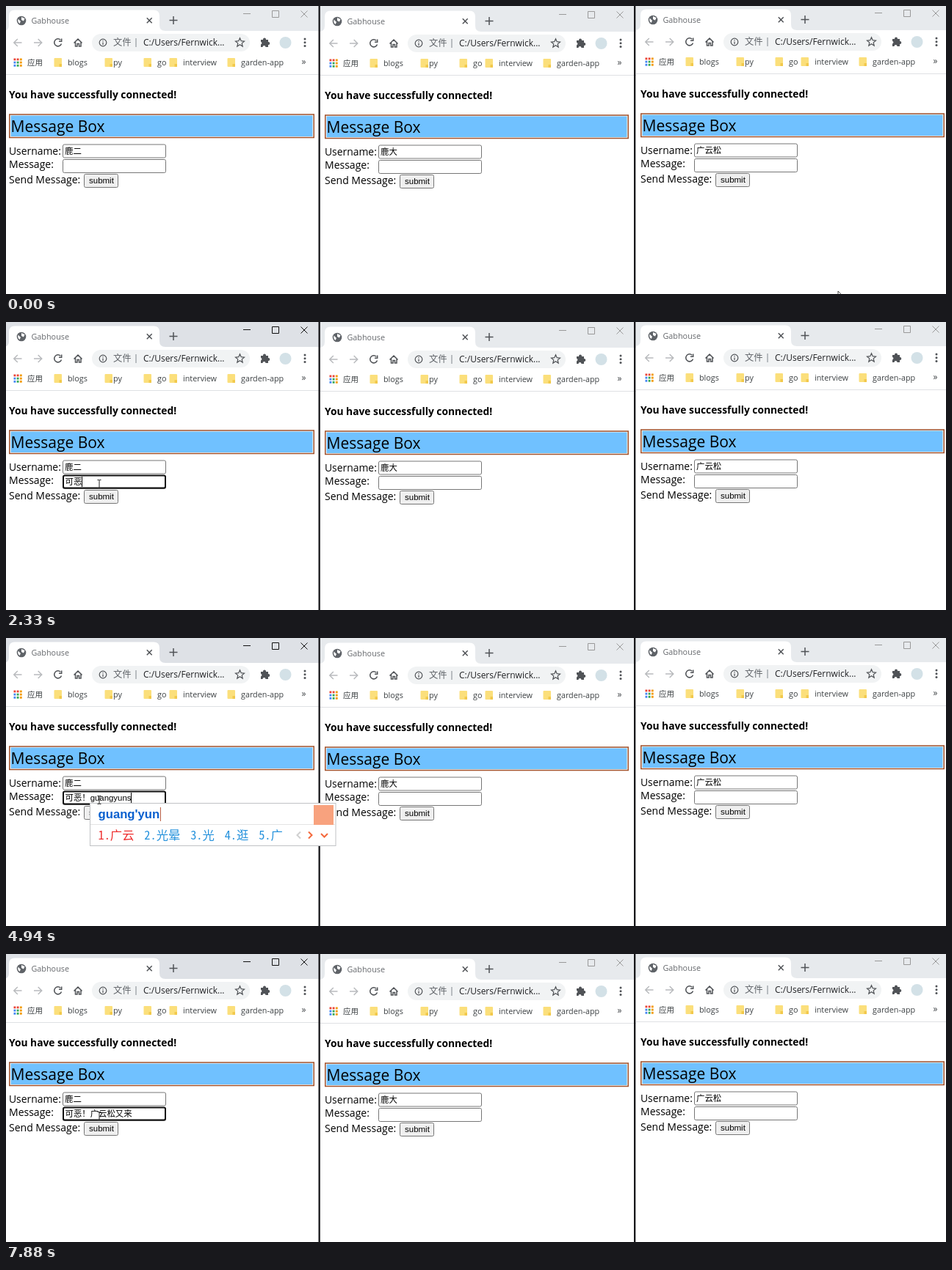
Recreate the animation shown at these times as an HTML page. Size 1280x393 px, loop 8000 ms.

```html
<!DOCTYPE html>
<html lang="zh">
<head>
<meta charset="utf-8">
<title>Chat windows</title>
<style>
html, body { margin: 0; width: 100%; height: 100%; overflow: hidden; background: #fff; }
svg { display: block; width: 1280px; height: 393px; }
text { white-space: pre; }
.ui { font-family: "Open Sans", "Noto Sans CJK SC", sans-serif; }
.field { font-family: "Liberation Sans", "Noto Sans CJK SC", sans-serif; }
.bold { font-family: "Open Sans", sans-serif; font-weight: 700; }
.typed { font-family: "Liberation Sans", sans-serif; font-weight: 700; }
.cand { font-family: "Noto Sans Mono CJK SC", "Noto Sans CJK SC", monospace; }
.strip { fill: #e7eaed; }
.ctl { stroke: #999; fill: none; }
.focus .w0 .strip { fill: #dee1e6; }
.focus .w0 .ctl { stroke: #111; }
.line { fill: none; stroke: #505357; stroke-width: 1.5; }
.dim { stroke: #b9bbbe; }
</style>
</head>
<body>
<svg id="stage" viewBox="0 0 1280 393"></svg>
<script>
const LOOP = 8000, EM = 16.35, GAP = 13.8, CHAR = 11.4;
const stage = document.getElementById('stage');
const ruler = document.createElement('canvas').getContext('2d');

const text = (s, x, y, size, fill = '#000', cls = 'ui') =>
  `<text x="${x}" y="${y}" font-size="${size}" fill="${fill}" class="${cls}">${s}</text>`;
const rect = (x, y, w, h, fill, more = '') =>
  `<rect x="${x}" y="${y}" width="${w}" height="${h}" fill="${fill}" ${more}/>`;
const path = (d, cls = 'line', more = '') => `<path d="${d}" class="${cls}" ${more}/>`;
const circle = (x, y, r, fill, more = '') =>
  `<circle cx="${x}" cy="${y}" r="${r}" fill="${fill}" ${more}/>`;
const measure = (s, font) => { ruler.font = font; return ruler.measureText(s).width; };

function star(cx, cy, r) {
  const pts = Array.from({ length: 10 }, (_, i) => {
    const a = i * Math.PI / 5 - Math.PI / 2, k = i % 2 ? r * 0.45 : r;
    return (cx + k * Math.cos(a)).toFixed(1) + ',' + (cy + k * Math.sin(a)).toFixed(1);
  });
  return path(`M${pts.join('L')}Z`, 'line', 'style="stroke-width:1.2"');
}

function browserTop() {
  const dots = ['#ea4335', '#ea4335', '#f29900', '#4285f4', '#34a853', '#f29900', '#4285f4', '#34a853', '#f29900'];
  const marks = [['blogs', 65, 84], ['py', 134, 146], ['go', 187, 206], ['interview', 222, 241], ['garden-app', 301, 320]];
  return rect(-2, -2, 430, 36, '', 'class="strip"') +
    path('M-4 34Q4 34 4 26V13.500Q4 5.500 12 5.500H201Q209 5.500 209 13.500V26Q209 34 217 34Z', '', 'fill="#fff"') +
    circle(21, 20, 6.3, '#5f6368') +
    path('M16.500 17.500L20 21L18.500 24Q15.500 22 16.500 17.500M21 15L25.500 17L24 20.500L21 19Z', '', 'fill="#fff"') +
    text('Gabhouse', 34.500, 24, 10.8, '#66696d') +
    path('M191.800 16.300L198.700 23.200M198.700 16.300L191.800 23.200') +
    path('M222.500 19.500H233.500M228 14V25') +
    path('M323 10.500H333M362.500 6.500H371.500V15.500H362.500ZM401.500 6.500L410.500 15.500M410.500 6.500L401.500 15.500', 'ctl') +
    path('M21.500 50H11M15.800 45L10.800 50L15.800 55M38 50H48.500M43.700 45L48.700 50L43.700 55', 'line dim') +
    path('M74.300 46.300A5 5 0 1 0 75.500 51.500M75.700 44.500V48.200H72') +
    path('M92.500 50.500L98 45L103.500 50.500M94.500 49V55H97V51.500H99.500V55H102V49') +
    rect(117, 38, 215, 24, '#f1f3f4', 'rx="12"') +
    circle(132, 50, 4.8, 'none', 'class="line" style="stroke-width:1.2"') +
    path('M132 49.500V53M132 47V48.200', 'line', 'style="stroke-width:1.2"') +
    text('文件', 146, 54, 12.3, '#5f6368') + rect(176.500, 44, 1, 12, '#80868b') +
    text('C:/Users/Fernwick...', 187, 53.500, 12, '#202124') +
    star(318.500, 50, 6.3) +
    path('M347 46H350V45.500A2 2 0 0 1 354 45.500V46H357V49H357.300A2 2 0 0 1 357.300 53H357V56H353.500A2 2 0 0 0 349.500 56H347V52.500A2 2 0 0 0 347 48.700Z', '', 'fill="#505357"') +
    circle(380.500, 50, 8, '#d3e1e7') +
    [45, 49.7, 54.4].map(y => circle(407, y, 1.5, '#505357')).join('') +
    dots.map((c, i) => rect(10.500 + i % 3 * 4.2, 71.500 + (i / 3 | 0) * 4.2, 2.8, 2.8, c)).join('') +
    text('应用', 29, 81, 10.5, '#3c4043') +
    marks.map(([s, fx, tx]) => rect(fx + .5, 71, 10.5, 12, '#fbdf7b', 'rx="1"') +
      rect(fx + 7.5, 79, 3.5, 4, '#f2c94c') + text(s, tx, 81, 10.8, '#3c4043')).join('') +
    text('»', 402.500, 80, 12, '#3c4043') +
    rect(-2, 93, 430, 1, '#dfe1e4');
}

function page(user, width) {
  const box = (x, y, w, h, fill) => rect(x, y, w, h, fill, 'rx="2" stroke="#767676"');
  return text('You have successfully connected!', 4, 126, 13.8, '#000', 'bold') +
    rect(4.75, 148, width, 31.5, '#fff', 'stroke="#a0522d" stroke-width="1.5"') +
    rect(6.5, 149.5, width - 3.5, 28.5, '#70c1ff') +
    text('Message Box', 6.5, 171.5, 21) +
    text('Username:', 4, 202.5, 13.9) + box(77.5, 189, 140, 18, '#fff') + text(user, 80, 202, CHAR, '#000', 'field') +
    text('Message:', 4, 221, 14) + box(77.5, 209.5, 140, 18, '#fff') +
    text('Send Message:', 4, 242, 14) + box(106.5, 229.5, 46, 18, '#efefef') +
    text('submit', 113, 242, 11.5, '#000', 'field');
}

const win = (i, user) =>
  `<g class="w${i}" transform="translate(${i * 430} ${[0, 1, -1][i]})">${browserTop()}${page(user, i ? 412.5 : 414.5)}</g>`;

stage.innerHTML = rect(0, 0, 1280, 393, '#fff') +
  win(0, '鹿二') + win(1, '鹿大') + win(2, '广云松') +
  rect(425.5, 0, 2.3, 393, '#17171a') + rect(855, 0, 2.3, 393, '#17171a') + '<g id="live"></g>';
const live = document.getElementById('live');

// Each step: start time, committed text, raw keys, input-method label, candidates
const A = '可恶！', B = A + '广云松';
const ke = '可 课 科 克 客', gu = '古 股 顾 故 骨', guan = '关 官 管 观 馆', guang = '光 广 逛 广东 咣',
  gy = '光耀 光影 光源 广义相对论 光缘', gyun = '广云 光晕 光 逛 广', gs = '广云松 光云松 广运送 光晕送 广云',
  you = '有 又 由 ヽ(￣▽￣～)ノ you', lai = '又来 有来 由来 游来 友来';
const steps = [
  [740, ''],
  [1480, '', 'k'],
  [1540, '', 'k', 'k', '看 可 开 快 卡'],
  [1610, '', 'ke', 'ke', ke],
  [1810, '', 'kew', 'ke', ke],
  [1860, '', 'kew', "ke'w", '可恶 课文 科 可 课'],
  [1910, '', 'kewu', "ke'w", '可恶 课文 科 可 课'],
  [1970, '', 'kewu', "ke'wu", '可恶 可无 (▼へ▼メ) 科武 可误'],
  [2330, '可恶'],
  [3050, A],
  [3780, A, 'g', 'g', '个 该 给 跟 改'],
  [3880, A, 'gu', 'gu', gu],
  [3950, A, 'gua', 'gua', '挂 瓜 刮 寡 卦'],
  [4020, A, 'guan', 'gua', '挂 瓜 刮 寡 卦'],
  [4090, A, 'guan', 'guan', guan],
  [4160, A, 'guang', 'guang', guang],
  [4460, A, 'guangy', "guang'y", gy],
  [4550, A, 'guangyu', "guang'yu", '光宇 广域 光 逛 广'],
  [4640, A, 'guangyun', "guang'yun", gyun],
  [4940, A, 'guangyuns', "guang'yun", gyun],
  [4990, A, 'guangyuns', "guang'yun's", gs],
  [5070, A, 'guangyunso', "guang'yun'so", gs],
  [5150, A, 'guangyunson', "guang'yun'son", gs],
  [5230, A, 'guangyunsong', "guang'yun'song", gs],
  [5470, B],
  [6130, B, 'y', 'y', '一 有 要 也 以'],
  [6540, B, 'yo', 'yo', '哟 有 又 由 用'],
  [6610, B, 'you', 'yo', '哟 有 又 由 用'],
  [6690, B, 'you', 'you', you],
  [6970, B, 'youl', "you'l", "又来 有了 有力 (o゜▽゜)o☆ you'll"],
  [7100, B, 'youla', "you'la", '又拉 有啦 又来 油辣 有'],
  [7200, B, 'youlai', "you'lai", lai],
  [7370, B + '又来']
];

const ems = s => [...s].reduce((n, c) => n + (c.charCodeAt(0) < 128 ? .5 : 1), 0);

function popup(x, label, cands) {
  let cx = x + 11.5, row = '';
  cands.split(' ').forEach((word, i) => {
    const fill = i ? '#2491dc' : '#ee2f2f';
    row += text(i + 1 + '.', cx, 274.5, EM, fill, 'cand') + text(word, cx + EM, 274.5, EM, fill, 'cand');
    cx += EM * (1 + ems(word)) + GAP;
  });
  const right = Math.round(cx - GAP + 72);
  const end = x + 11.5 + measure(label, 'bold 16.7px "Liberation Sans", sans-serif');
  const arrow = (d, c) => path(d, '', `fill="none" stroke="${c}" stroke-width="2"`);
  return rect(x + .5, 225.5, right - x - .5, 58, '#fff', 'stroke="#c0c2c5"') +
    rect(x + 1, 254, right - x - 1, 1, '#e4e4e4') +
    text(label, x + 11.5, 246, 16.7, '#0a60cf', 'typed') + rect(end + .7, 231, 1, 19, '#b8583c') +
    rect(right - 30, 228, 27, 27, '#f8a27e') + row +
    arrow(`M${right - 48} 264.500l-4.500 4.500l4.500 4.500`, '#d0d0d0') +
    arrow(`M${right - 37} 264.500l4.500 4.500l-4.500 4.500`, '#f4693c') +
    arrow(`M${right - 20} 267l4.500 4.500l4.500 -4.500`, '#f4693c');
}

function pointer(t) {
  const p = Math.min(1, Math.max(0, (t - 30) / 670)), k = (1 - Math.cos(Math.PI * p)) / 2;
  const x = 1133 - 1006 * k, y = 389 - 168 * k;
  const at = `transform="translate(${x.toFixed(1)} ${y.toFixed(1)})"`;
  return x < 217
    ? path('M-2.500 -5.500H-.5L0 -5L.5 -5.500H2.500M0 -5V5M-2.500 5.500H-.5L0 5L.5 5.500H2.500', '', `fill="none" stroke="#222" ${at}`)
    : path('M0 0V12L2.800 9.500L4.800 14L6.600 13.200L4.700 9H8.500Z', '', `fill="#fff" stroke="#222" stroke-width=".8" ${at}`);
}

function draw(t) {
  const step = steps.filter(s => s[0] <= t).pop();
  stage.classList.toggle('focus', !!step);
  let out = '';
  if (step) {
    const [start, done, raw = '', label, cands] = step;
    out += rect(78, 209.5, 139, 17, '#fff', 'rx="2" stroke="#101010" stroke-width="2"') +
      text(done + raw, 80.5, 221.5, CHAR, '#000', 'field');
    const caret = 80.5 + done.length * CHAR + measure(raw, CHAR + 'px "Liberation Sans", sans-serif');
    if ((t - start) % 1020 < 510) out += rect(Math.round(caret), 211, 1, 14, '#000');
    if (label) out += popup(Math.round(79.6 + done.length * 11.3), label, cands);
  }
  return out + pointer(t);
}

let shown;
function tick(now) {
  const next = draw(now % LOOP);
  if (next !== shown) live.innerHTML = shown = next;
  requestAnimationFrame(tick);
}
tick(0);
</script>
</body>
</html>
```
